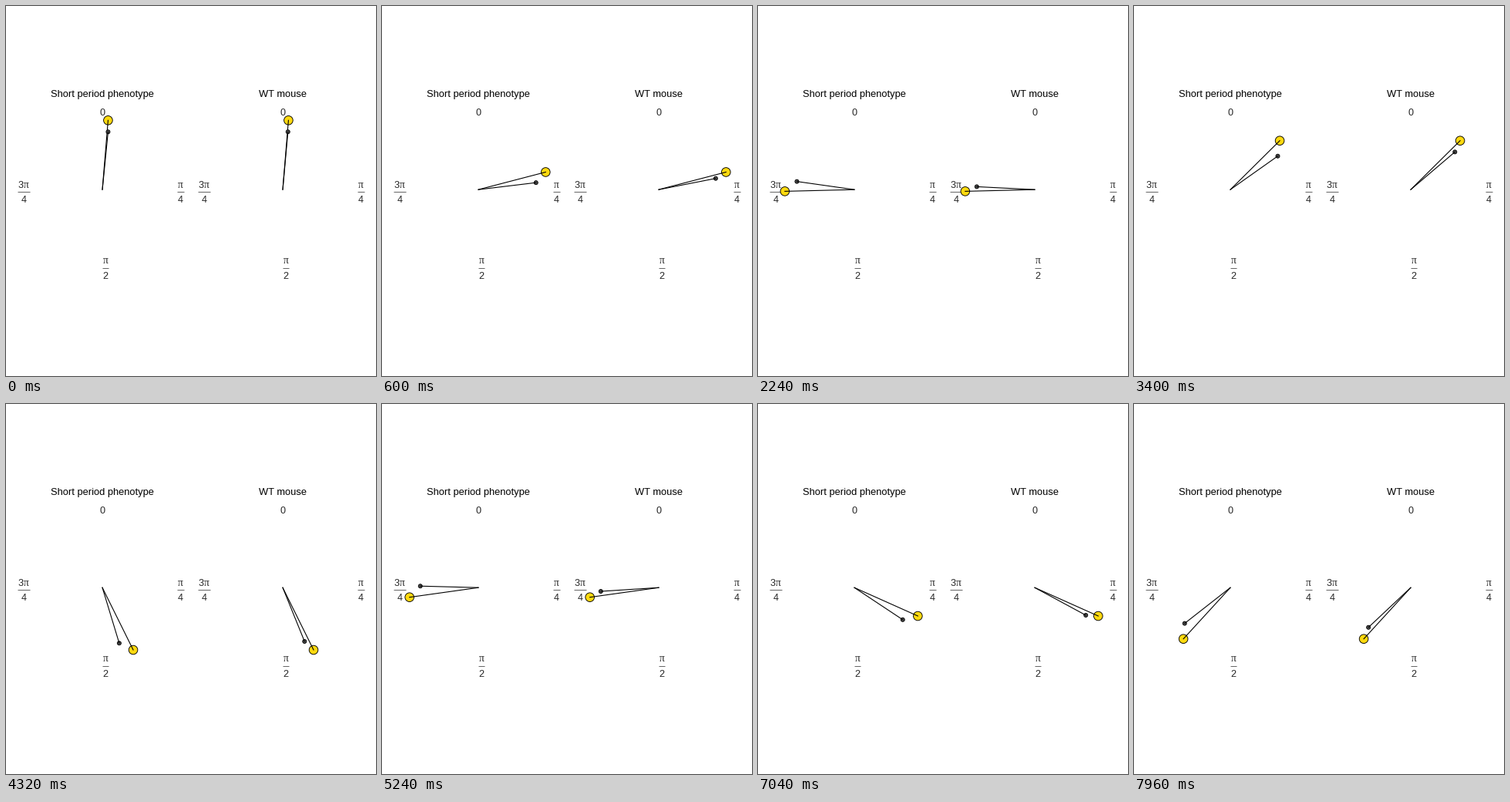
These frames come from a looping animation (480 px wide and 480 px high, 8000 ms). A matplotlib script:

```python
import math
import matplotlib.pyplot as plt
from matplotlib.animation import FuncAnimation
from matplotlib.patches import Circle, Rectangle

SIZE = 480
FRAMES, INTERVAL = 200, 40
STEP = math.pi / 10            # hours per frame
OMEGA = 2 * math.pi / 24
PULL = 0.1                     # share of the phase gap closed per frame
SUN_R, MOUSE_R = 90.2, 75.3
CY = 238.2
TICK = "#262626"

fig = plt.figure(figsize=(SIZE / 72, SIZE / 72), dpi=72, facecolor="white")
ax = fig.add_axes([0, 0, 1, 1])
ax.set_xlim(0, SIZE)
ax.set_ylim(SIZE, 0)
ax.axis("off")

window = Rectangle((0, 0), SIZE, 351, transform=ax.transData)


def label(x, y, s, size=12.6, color=TICK, font="Liberation Sans"):
    t = ax.text(x, y, s, fontsize=size, color=color, family=font,
                ha="center", va="baseline", zorder=1)
    t.set_clip_path(window)


def fraction(x, y, top, bottom, half):
    if top:
        label(x - 3.6, y - 5.5, top)
        label(x + 3.7, y - 5.5, "π", 13.5, font="Liberation Serif")
    else:
        label(x, y - 5.5, "π", 13.5, font="Liberation Serif")
    ax.plot([x - half, x + half], [y, y], color=TICK, lw=0.7,
            solid_capstyle="butt", zorder=1)
    label(x, y + 14, bottom)


class Clock:
    def __init__(self, cx, title, period):
        self.cx = cx
        gap = 2 * math.pi / period - OMEGA
        self.lead = math.asin(gap * STEP / PULL)
        label(cx - 0.2, 118, title, 12.9, "black")
        label(cx - 0.4, 142.3, "0")
        fraction(cx - 102, 241, "3", "4", 7.8)
        fraction(cx + 101.5, 241, "", "4", 4.2)
        fraction(cx + 3.8, 340, "", "2", 4.2)
        self.sun = self.hand(5.8, "#ffd90f", 2)
        self.mouse = self.hand(2.5, "#4d4d4d", 4)

    def hand(self, r, color, z):
        dot = Circle((0, 0), r, fc=color, ec="black", lw=0.9, zorder=z)
        ax.add_patch(dot)
        line, = ax.plot([], [], color="black", lw=1.1, zorder=z + 1)
        return dot, line

    def point(self, hand, angle, r):
        dot, line = hand
        x = self.cx + r * math.sin(angle)
        y = CY - r * math.cos(angle)
        dot.center = x, y
        line.set_data([self.cx, x], [CY, y])

    def update(self, n):
        sun = OMEGA * STEP * n
        self.point(self.sun, sun, SUN_R)
        # the mouse rhythm settles to a fixed lead over the sun
        self.point(self.mouse, sun + self.lead * (1 - (1 - PULL) ** n), MOUSE_R)
        return [*self.sun, *self.mouse]


clocks = [Clock(125, "Short period phenotype", 20), Clock(359, "WT mouse", 22)]


def draw(i):
    return [a for c in clocks for a in c.update(i + 1)]


anim = FuncAnimation(fig, draw, frames=FRAMES, interval=INTERVAL,
                     repeat=True, repeat_delay=0, blit=False)
plt.show()
```
